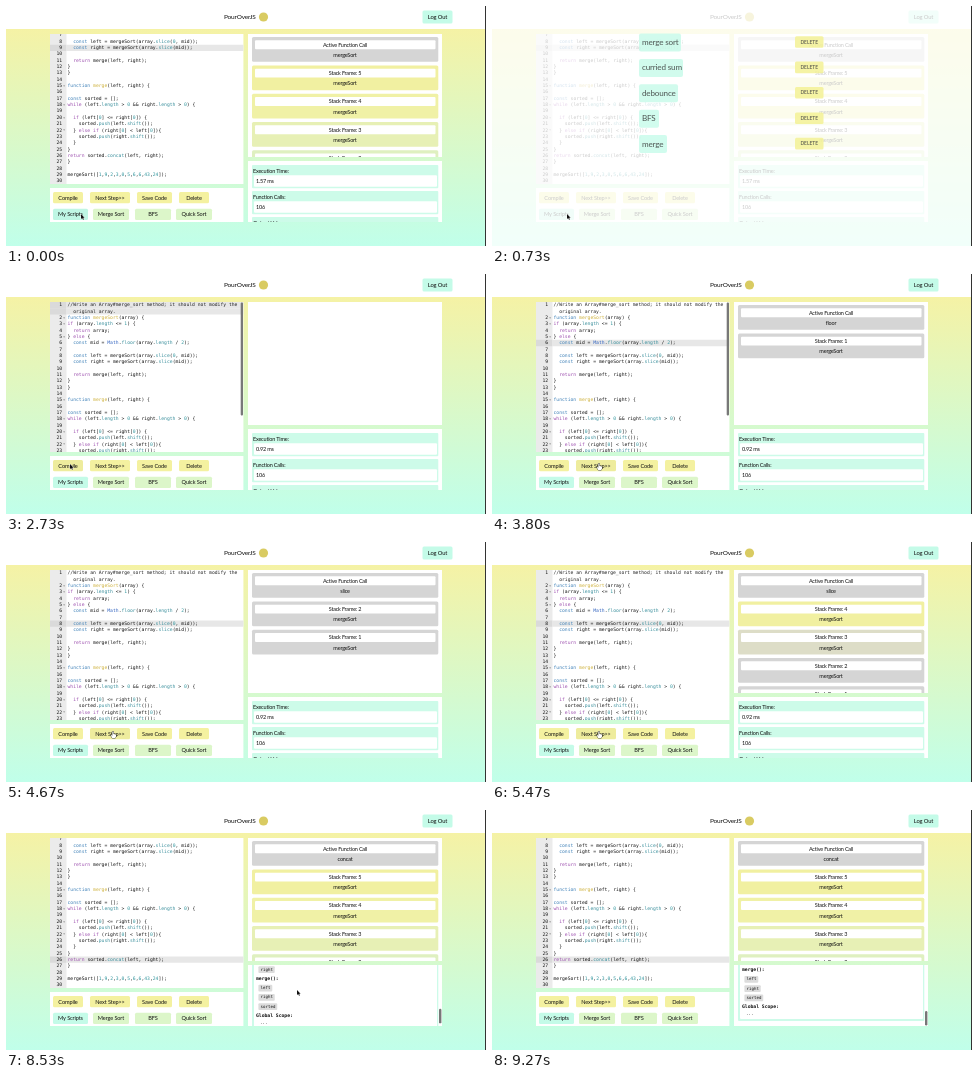
An HTML page with a canvas for the animation above (9.39 s loop, 480 px wide and 240 px high).

```html
<!DOCTYPE html>
<html lang="en">
<head>
<meta charset="utf-8">
<title>PourOverJS</title>
<style>
html, body { margin: 0; width: 100%; height: 100%; overflow: hidden; background: #fff; }
canvas { display: block; width: 480px; height: 240px; }
</style>
</head>
<body>
<canvas></canvas>
<script>
const LOOP = 9390, ROW = 6.34, CHAR = 2.842;
const SANS = 'Lato, sans-serif', MONO = '"DejaVu Sans Mono", monospace';
const MINT = '#c4fbe8', YELLOW = '#f4f1a0', GREY = [213, 213, 213];
const canvas = document.querySelector('canvas'), ctx = canvas.getContext('2d');
const dpr = window.devicePixelRatio || 1;
canvas.width = 480 * dpr;
canvas.height = 240 * dpr;

const code = `//Write an Array#merge_sort method; it should not modify the
  original array.
function mergeSort(array) {
if (array.length <= 1) {
  return array;
} else {
  const mid = Math.floor(array.length / 2);

  const left = mergeSort(array.slice(0, mid));
  const right = mergeSort(array.slice(mid));

  return merge(left, right);
}
}

function merge(left, right) {

const sorted = [];
while (left.length > 0 && right.length > 0) {

  if (left[0] <= right[0]) {
    sorted.push(left.shift());
  } else if (right[0] < left[0]){
    sorted.push(right.shift());
  }
}
return sorted.concat(left, right);
}

mergeSort([1,9,2,3,0,5,6,6,43,24]);
`.split('\n');

// time, active call, highlighted line, stack depth
const steps = [
  [0, 'mergeSort', 9, 5], [2000, '', 1, 0], [3050, 'mergeSort', 29, 0], [3400, 'floor', 6, 1],
  [3930, 'slice', 8, 1], [4150, 'mergeSort', 8, 1], [4400, 'floor', 6, 2], [4550, 'slice', 8, 2],
  [4700, 'mergeSort', 8, 2], [4850, 'floor', 6, 3], [5000, 'slice', 8, 3],
  [5130, 'mergeSort', 8, 3], [5250, 'floor', 6, 4], [5400, 'slice', 8, 4],
  [5600, 'mergeSort', 8, 4], [5730, 'slice', 9, 4], [5860, 'mergeSort', 9, 4],
  [6000, 'merge', 11, 4], [6130, 'shift', 21, 5], [6270, 'push', 21, 5], [6470, 'concat', 26, 5]
];

// time, x, y of the pointer tip
const path = [
  [0, 75, 208], [900, 75, 208], [1500, 150, 110], [1730, 172, 51], [1880, 168, 36],
  [2150, 168, 36], [2500, 64, 190], [2750, 64, 190], [3000, 107, 190], [7230, 107, 190],
  [7400, 166, 199], [7530, 218, 182], [7670, 218, 182], [7800, 291, 180], [LOOP, 291, 180]
];

const buttons = [
  ['Compile', 47, 186, 30, YELLOW], ['Next Step>>', 84, 186, 40, YELLOW],
  ['Save Code', 131, 186, 35, YELLOW], ['Delete', 173, 186, 30, YELLOW],
  ['My Scripts', 47, 202.7, 35, MINT], ['Merge Sort', 87, 202.7, 36, '#dcf6c9'],
  ['BFS', 129, 202.7, 36, '#dcf6c9'], ['Quick Sort', 170, 202.7, 36, '#dcf6c9']
];
const scripts = [['merge sort', 42], ['curried sum', 44], ['debounce', 39], ['BFS', 20], ['merge', 28]];
const scope = ['mergeSort():', ' array', ' mid', ' left', ' right', 'mergeSort():', ' array', ' mid',
  ' left', ' right', 'merge():', ' left', ' right', ' sorted', 'Global Scope:', ' ...'];

const ramp = (t, from, to) => Math.min(1, Math.max(0, (t - from) / (to - from)));
const smooth = u => u * u * (3 - 2 * u);
const mix = (a, b, u) => `rgb(${a.map((v, i) => v + (b[i] - v) * u)})`;

function box(x, y, w, h, color, r = 0) {
  ctx.fillStyle = color;
  ctx.beginPath();
  ctx.roundRect(x, y, w, h, r);
  ctx.fill();
}

function label(str, x, y, { size = 5.5, gap = -0.2, color = '#111', align = 'left', font = SANS, weight = 400 } = {}) {
  ctx.font = `${weight} ${size}px ${font}`;
  ctx.letterSpacing = gap + 'px';
  ctx.textAlign = align;
  ctx.fillStyle = color;
  ctx.fillText(str, x, y);
}

function clipped(x, y, w, h, draw) {
  ctx.save();
  ctx.beginPath();
  ctx.rect(x, y, w, h);
  ctx.clip();
  draw();
  ctx.restore();
}

function pointerAt(t) {
  const i = path.findIndex(p => p[0] > t), a = path[i - 1], b = path[i];
  const u = smooth(ramp(t, a[0], b[0]));
  return [a[1] + (b[1] - a[1]) * u, a[2] + (b[2] - a[2]) * u];
}

const inside = ([px, py], x, y, w, h) => px >= x && px <= x + w && py >= y && py <= y + h;

function tokenColor(word, before) {
  if (/^(const|function)$/.test(word)) return '#3f80b8';
  if (/^(if|else|return|while)$/.test(word)) return '#9c4fae';
  if (/^\d/.test(word)) return '#2f949c';
  if (word === 'Math') return '#3465c0';
  if (before === 'function ') return '#cdb03a';
  if (/^(slice|floor|push|shift|concat|length)$/.test(word)) return '#3a8f9c';
  return '#111';
}

function drawEditor(t, line) {
  const scroll = t < 2000 ? 46.2 : 46.2 * smooth(ramp(t, 6300, 6480));
  const mono = { size: 4.72, gap: 0, font: MONO };
  clipped(44, 28, 193.4, 150, () => {
    box(44, 28, 194, 150, '#fff');
    box(44, 28, 16.5, 150, '#ebebeb');
    code.forEach((text, row) => {
      const y = 31 + row * ROW - scroll, number = row === 0 ? 1 : row;
      if (number === line) {
        box(44, y - 3.2, 16.5, ROW, '#dadada');
        box(60.5, y - 3.2, 178, ROW, '#e7e7e7');
      }
      if (row !== 1) label(number, 56.2, y, { ...mono, align: 'right' });
      if (row > 1 && /\{$/.test(text)) label('▾', 57, y, { ...mono, size: 3.6, color: '#666' });
      if (row < 2) return label(text, 61.5, y, { ...mono, color: '#222' });
      for (const m of text.matchAll(/\w+|[^\w\s]+/g)) {
        const color = tokenColor(m[0], text.slice(0, m.index));
        label(m[0], 61.5 + m.index * CHAR, y, { ...mono, color });
      }
    });
    const alpha = ramp(t, 1990, 2000) * (1 - ramp(t, 4200, 4400));
    box(234.7, 28.5, 2.3, 113, `rgba(120,120,120,${alpha})`, 1);
  });
}

function drawCard(y, title, name, color) {
  box(246, y, 186.3, 24.8, color, 1.5);
  box(249, y + 3.3, 180.5, 8.9, '#fff', 1);
  label(title, 339, y + 8, { align: 'center' });
  label(name, 339, y + 18.2, { align: 'center' });
}

function drawStack(t, active, depth) {
  const tints = [[241, 240, 161], [240, 241, 166], [231, 240, 181], [223, 240, 192], [216, 240, 200]];
  clipped(242, 28, 194, 123, () => {
    box(242, 28, 194, 123, '#fff');
    if (active) drawCard(31, 'Active Function Call', active, `rgb(${GREY})`);
    for (let i = 0; i < depth; i++) {
      const u = t < 2000 ? 1 : ramp(t, 5130 + i * 260, 5400 + i * 260);
      drawCard(59.4 + i * 28.3, 'Stack Frame: ' + (depth - i), 'mergeSort', mix(GREY, tints[i], u));
    }
  });
}

function drawStats(t) {
  const scroll = 187 * (1 - (1 - ramp(t, 8000, 8830)) ** 3);
  const field = (y, title, value) => {
    box(246, y, 186.3, 23.3, '#cdfbe9', 1);
    label(title, 247, y + 6.3);
    box(248, y + 10.2, 183, 11.6, '#fff', 1);
    label(value, 250, y + 16);
  };
  clipped(242, 155, 194, 61, () => {
    box(242, 155, 194, 61, '#fff');
    ctx.translate(0, -scroll);
    field(159, 'Execution Time:', t < 2700 ? '1.57 ms' : '0.92 ms');
    field(185, 'Function Calls:', '106');
    field(211, 'Output Value:', '');
    box(246, 238.5, 186.3, 159.5, '#cdfbe9', 1);
    label('Variables:', 247, 245);
    box(248, 249, 183, 147, '#fff', 1);
    scope.forEach((entry, i) => {
      const y = 255 + i * 9.22, name = entry.trim(), mono = { gap: 0, font: MONO };
      if (name === '...') {
        label(name, 254, y - 2.5, { ...mono, size: 4.1 });
      } else if (name !== entry) {
        box(252.4, y - 3.4, name.length * 2.47 + 4, 6.8, '#dcdcdc', 1);
        label(name, 254.6, y, { ...mono, size: 4.1 });
      } else {
        label(name, 250, y, { ...mono, size: 4.72, weight: 600 });
      }
    });
    ctx.translate(0, scroll);
    if (t >= 8000) box(433, 155 + scroll * 0.246, 2.4, 14.5, '#777', 1.2);
  });
}

function drawButtons(pointer) {
  box(44, 182, 193.4, 34, '#fff');
  for (const [text, x, y, w, color] of buttons) {
    box(x, y, w, 11.3, color, 1.5);
    if (inside(pointer, x, y, w, 11.3)) box(x, y, w, 11.3, 'rgba(0,60,60,.025)', 1.5);
    label(text, x + w / 2, y + 5.9, { size: 5.6, gap: -0.12, align: 'center' });
  }
}

function drawHeader() {
  box(0, 0, 480, 23, '#fff');
  label('PourOverJS', 218, 11, { size: 6.5, gap: -0.18 });
  ctx.fillStyle = '#d9cb62';
  ctx.beginPath();
  ctx.arc(257.5, 11, 4.6, 0, 7);
  ctx.fill();
  box(416.5, 4.5, 30, 13, MINT, 1.5);
  label('Log Out', 431.5, 11.2, { size: 5.8, gap: -0.15, align: 'center' });
}

function drawModal(t, pointer) {
  const alpha = smooth(ramp(t, 400, 850)) * (1 - smooth(ramp(t, 1600, 2330)));
  if (!alpha) return;
  ctx.globalAlpha = alpha;
  box(0, 0, 480, 240, 'rgba(255,255,255,.95)');
  scripts.forEach(([text, w], i) => {
    const y = 36.5 + i * 25.4, hover = inside(pointer, 147, y - 11, w, 21);
    const grow = hover ? 1 : 0;
    box(147 - grow / 2, y - 9 - grow, w + grow * 3.5, 18 + grow * 2, hover ? '#aef0df' : '#c8fbea', 2);
    label(text, 150, y, { size: 8.1, gap: -0.17, color: '#333' });
    box(303, y - 6.3, 28.5, 11.6, '#f3f092', 1.5);
    label('DELETE', 317.2, y - 0.4, { size: 4.9, gap: 0, align: 'center', weight: 600, color: '#444' });
  });
  ctx.globalAlpha = 1;
}

function drawPointer(t, [x, y]) {
  if (t > 8870) return;
  ctx.save();
  ctx.translate(x, y);
  const hand = inside([x, y], 84, 186, 40, 11.3);
  const shape = new Path2D(hand
    ? 'M-.6-.5H.5V2L3 2.6V4.4L2.2 6.2H-.6L-2.2 3.6L-1.6 3L-.6 3.8Z'
    : 'M0 0V5L1.2 4L2 5.8L2.9 5.4L2.1 3.7H3.6Z');
  ctx.lineWidth = 0.8;
  ctx.strokeStyle = hand ? '#222' : '#fff';
  ctx.fillStyle = hand ? '#fff' : '#111';
  ctx.stroke(shape);
  ctx.fill(shape);
  ctx.restore();
}

function draw(t) {
  const [, active, line, depth] = steps.filter(s => s[0] <= t).pop();
  const pointer = pointerAt(t);
  ctx.setTransform(dpr, 0, 0, dpr, 0, 0);
  ctx.textBaseline = 'middle';
  const sky = ctx.createLinearGradient(0, 23, 0, 240);
  sky.addColorStop(0, '#f5f2a5');
  sky.addColorStop(1, '#c0ffea');
  box(0, 0, 480, 240, sky);
  drawHeader();
  drawEditor(t, line);
  drawButtons(pointer);
  drawStack(t, active, depth);
  drawStats(t);
  drawModal(t, pointer);
  drawPointer(t, pointer);
  box(479, 0, 1, 240, '#333');
}

const start = performance.now();
function tick() {
  draw((performance.now() - start) % LOOP);
  requestAnimationFrame(tick);
}
tick();
</script>
</body>
</html>
```
